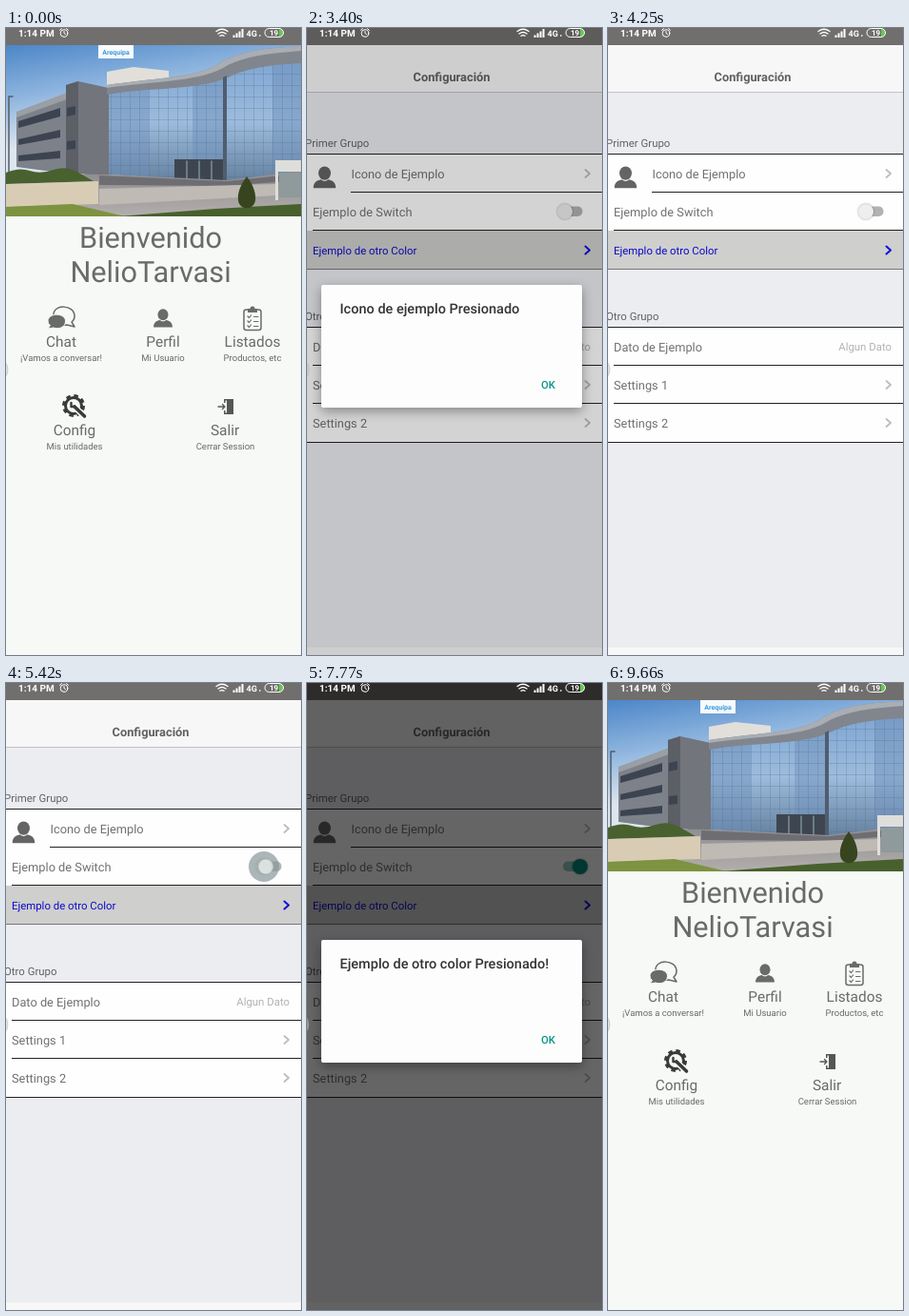
An HTML page for the animation above (9790 ms loop, 310 px wide and 659 px high).

```html
<!DOCTYPE html>
<html lang="es">
<head>
<meta charset="utf-8">
<style>
html, body { margin: 0; width: 100%; height: 100%; overflow: hidden; background: #f7f9f6; }
svg { display: block; width: 310px; height: 659px; font-family: Roboto, sans-serif; text-rendering: geometricPrecision; }
.mid { text-anchor: middle; }
.big { font-size: 30.7px; }
.item { font-size: 15.4px; }
.sub { font-size: 9.5px; }
.row { font-size: 12.8px; }
.small { font-size: 11.4px; }
.line { fill: none; stroke-linecap: round; stroke-linejoin: round; }
#dialog { filter: drop-shadow(0 4px 6px rgba(0, 0, 0, .35)); }
</style>
</head>
<body>
<svg viewBox="0 0 310 659">
  <defs>
    <linearGradient id="sky" x2=".35" y2="1"><stop stop-color="#4c86c8"/><stop offset=".35" stop-color="#8db4de"/><stop offset=".7" stop-color="#dde6ee"/></linearGradient>
    <linearGradient id="glass" x2="0" y2="1"><stop stop-color="#7fa6d2"/><stop offset=".5" stop-color="#9dbcdc"/><stop offset="1" stop-color="#64809f"/></linearGradient>
    <linearGradient id="pavement" x2="0" y2="1"><stop stop-color="#8d8c90"/><stop offset="1" stop-color="#b3aeac"/></linearGradient>
    <pattern id="panes" width="10" height="12" patternUnits="userSpaceOnUse"><path d="M0 0H10M0 0V12" stroke="#4d6c90" stroke-opacity=".55" fill="none"/></pattern>
    <symbol id="person" overflow="visible"><ellipse cy="-5" rx="5.8" ry="6.4"/><path d="M-10.500 9C-10.500 3-7 2-3.500 1Q0 4 3.500 1C7 2 10.500 3 10.500 9Z"/></symbol>
  </defs>

  <g id="home">
    <path fill="#f7f9f6" d="M0 18H310V659H0Z"/>
    <g id="photo">
      <path fill="url(#sky)" d="M0 18H310V160H0Z"/>
      <path fill="#7d8189" d="M11 90 64 70V153L11 146Z"/>
      <path fill="#9a9ea5" d="M11 88 64 68V75L11 94Z"/>
      <path fill="#72757c" d="M63 60 76 56 108 63V156L63 152Z"/>
      <path fill="#5c5f66" d="M63 60 76 56V153L63 152Z"/>
      <path fill="#3c4452" d="M13 98 57 84V93L13 105ZM13 117 57 107V115L13 123ZM13 134 57 129V137L13 140Z"/>
      <path fill="#3c4452" d="M64 84 73 82V91L64 93ZM64 119 73 118V127L64 128Z"/>
      <path fill="#e2dfdb" d="M106 46 134 41 171 45V57L106 66Z"/>
      <path fill="url(#glass)" d="M108 68 228 50 246 37 310 35V152L232 162 108 154Z"/>
      <path fill="#6d8fb8" opacity=".45" d="M108 68 150 64V156L108 154ZM196 58 228 50V161L196 160ZM280 36H310V152L280 156Z"/>
      <path fill="url(#panes)" d="M108 68 228 50 246 37 310 35V152L232 162 108 154Z"/>
      <path fill="#81858e" d="M106 60C150 53 196 53 221 39C241 25 270 21 310 19V37C269 39 249 44 233 52C200 66 151 62 106 70Z"/>
      <path fill="#a9adb4" d="M106 60C150 53 196 53 221 39C241 25 270 21 310 19V24C269 27 246 31 228 42C200 57 151 56 106 63Z"/>
      <path fill="#505d6e" d="M228 52 232 50V163H228Z"/>
      <path fill="#3d4650" d="M177 138H228V162H177Z"/>
      <path class="line" stroke="#7b8d9b" stroke-width="1.500" d="M190 140V160M203 140V160M216 140V160"/>
      <path fill="url(#pavement)" d="M0 153 108 154 232 160 310 150V198H0Z"/>
      <path fill="#6e6e72" d="M98 155 232 161 310 153V160L232 166 98 165Z"/>
      <path fill="#bfbab4" d="M98 169 285 164V176L98 186Z"/>
      <path fill="#49602f" d="M0 152Q14 146 25 150T50 149T78 153L92 161 0 164Z"/>
      <path fill="#d8cdb4" d="M0 164 97 161V185L0 188Z"/>
      <path fill="#7d9340" d="M0 188 70 185 125 198H0Z"/>
      <path fill="#48602c" d="M118 198 220 190 310 185V198Z"/>
      <path fill="#37451f" d="M253 156C259 164 263 173 262 181C261 192 245 192 244 181C243 173 247 164 253 156Z"/>
      <path fill="#dededb" d="M283 139H310V151H286V181H283Z"/>
      <path fill="#8e9a9b" d="M287 152H310V178H287Z"/>
      <path class="line" stroke="#555c64" stroke-width="1.500" d="M3 151V72H7"/>
      <path fill="#f7fafc" d="M97 18H134V32H97Z"/>
      <text class="mid" x="115.500" y="28" font-size="7" font-weight="700" fill="#3a9bdc">Arequipa</text>
    </g>
    <g fill="#696b6a" class="mid">
      <text class="big" x="152" y="231">Bienvenido</text>
      <text class="big" x="152" y="267">NelioTarvasi</text>
      <g class="line" stroke="#696b6a" stroke-width="1.500">
        <path d="M50 302C49 290 72 290 72 303Q72 307 69 309L72 314 64 312Q58 313 54 310"/>
        <rect x="250" y="296" width="18" height="21.500" rx="2.500"/>
        <path d="M254 303l1.500 1.500 2-2.500M254 308l1.500 1.500 2-2.500M254 313l1.500 1.500 2-2.500M260.500 303.500H265M260.500 308.500H265M260.500 313.500H265" stroke-width="1.200"/>
      </g>
      <path d="M254 299V295H256.500A2.500 2.500 0 0 1 261.500 295H264V299Z"/>
      <path d="M44 308C44 299 62.500 299 62.500 308C62.500 315 55 317 50 315L44 316 46.500 312.500Q44 311 44 308Z" stroke="#f7f9f6"/>
      <use href="#person" transform="translate(165 306) scale(.95)"/>
      <text class="item" x="58" y="335">Chat</text><text class="sub" x="58" y="349.500">¡Vamos a conversar!</text>
      <text class="item" x="165" y="335">Perfil</text><text class="sub" x="165" y="349.500">Mi Usuario</text>
      <text class="item" x="259" y="335">Listados</text><text class="sub" x="259" y="349.500">Productos, etc</text>
      <g id="config">
        <g fill="none" stroke="#393b3a">
          <circle cx="71" cy="397" r="8.500" stroke-width="3"/>
          <circle cx="71" cy="397" r="10.500" stroke-width="3" stroke-dasharray="4.500 3.750"/>
          <path class="line" stroke="#f7f9f6" stroke-width="6.500" d="M72 398 82 408"/>
          <path class="line" stroke-width="3.600" d="M72 398 82.500 408"/>
          <path class="line" stroke-width="2.400" d="M68.500 394V398H72.500"/>
        </g>
        <text class="item" x="72" y="428">Config</text><text class="sub" x="72" y="443">Mis utilidades</text>
      </g>
      <path fill="#555756" d="M229 390H239V406H229V402H230.500V404.500H232V391.500H230.500V394H229ZM233 392 237.500 391V405L233 406Z"/>
      <path class="line" stroke="#555756" stroke-width="1.300" d="M223 398H230M227.500 395.500 230 398 227.500 400.500"/>
      <text class="item" x="230" y="428">Salir</text><text class="sub" x="230.500" y="443">Cerrar Session</text>
    </g>
  </g>

  <g id="settings">
    <path fill="#ecedf1" d="M0 18H310V651H0Z"/>
    <path fill="#f7f7f7" d="M0 18H310V67H0ZM0 651H310V659H0Z"/>
    <path stroke="#c2c3c5" d="M0 67.500H310"/>
    <path fill="#fefefe" d="M0 132H310V213H0ZM0 314H310V436H0Z"/>
    <path fill="#cfcfce" d="M0 213H310V253H0Z"/>
    <path stroke="#222" stroke-width="1.200" d="M0 132.500H310M46 172.500H310M6 212.500H310M0 314.500H310M6 354.500H310M6 394.500H310M0 435.500H310"/>
    <path stroke="#777" d="M0 253.500H310"/>
    <text class="mid row" x="152" y="56" font-weight="700" fill="#606162">Configuración</text>
    <g class="small" fill="#626366"><text x="-2" y="125">Primer Grupo</text><text x="-2" y="307">Otro Grupo</text></g>
    <use href="#person" transform="translate(18.500 158.200) scale(1.120)" fill="#646464"/>
    <g class="row" fill="#717171">
      <text x="46.500" y="158">Icono de Ejemplo</text>
      <text x="6" y="198">Ejemplo de Switch</text>
      <text x="6" y="340">Dato de Ejemplo</text>
      <text x="6" y="380">Settings 1</text>
      <text x="6" y="420">Settings 2</text>
    </g>
    <text class="small" x="6" y="238" fill="#0d0bc8">Ejemplo de otro Color</text>
    <text class="small" x="298" y="339" text-anchor="end" fill="#b2b2b4">Algun Dato</text>
    <g class="line" stroke="#bcbcc0" stroke-width="1.700">
      <path d="M292.500 149 297 153 292.500 157M292.500 371 297 375 292.500 379M292.500 411 297 415 292.500 419"/>
      <path stroke="#1210d8" stroke-width="2" d="M292.500 229.500 297 233.500 292.500 237.500"/>
    </g>
    <rect id="track" x="269" y="187.500" width="20.500" height="10.500" rx="5"/>
    <circle id="thumb" cy="193" r="8" style="filter:drop-shadow(0 .5px .8px rgba(0,0,0,.4))"/>
    <circle id="ripple" cy="193" fill="#87979a"/>
  </g>

  <path fill="#706f6d" d="M0 0H310V18H0Z"/>
  <path id="dim" d="M0 0H310V659H0Z"/>

  <g fill="#fff">
    <text x="13" y="9" font-size="10" font-weight="700">1:14 PM</text>
    <g class="line" stroke="#fff">
      <circle cx="61" cy="5.500" r="3.800"/><path d="M61 3.500V5.500L62.500 6.500M56.500 2.300 58.500 .6M65.500 2.300 63.500 .6"/>
      <path stroke-width="1.300" d="M221 3.500Q227 -1 233 3.500M223 6Q227 3 231 6M225 8.300Q227 7 229 8.300"/>
    </g>
    <path d="M238.500 7.500h2V10h-2ZM241.500 5.500h2V10h-2ZM244.500 3.500h2V10h-2ZM247.500 1h2V10h-2Z"/>
    <text x="252.500" y="9" font-size="9" font-weight="700">4G</text>
    <path d="M266 7h1.500v2H266Z" opacity=".7"/>
    <path d="M287 .5Q291.500 .5 291.500 5T287 9.500Z" fill="#67c653"/>
    <rect x="272" y=".5" width="19.500" height="9" rx="4.500" fill="none" stroke="#fff"/>
    <text class="mid" x="281.500" y="8" font-size="8" font-weight="700">19</text>
  </g>

  <g id="dialog">
    <rect x="15" y="270" width="274" height="129" rx="2" fill="#fdfdfd"/>
    <text id="title" x="34.500" y="300" font-size="14.500" font-weight="500" fill="#333"></text>
    <text x="246" y="378.500" font-size="11.300" font-weight="500" fill="#0b978a">OK</text>
  </g>

  <circle cx="-11" cy="359" r="13" fill="#ccc" fill-opacity=".5" stroke="#999" stroke-opacity=".35"/>
  <circle id="touch" r="8" fill="#fff" fill-opacity=".6" stroke="#999" stroke-opacity=".4"/>
</svg>

<script>
const LOOP = 9790;
const $ = Object.fromEntries([...document.querySelectorAll('[id]')].map(e => [e.id, e]));
const ramp = (t, from, to) => Math.min(1, Math.max(0, (t - from) / (to - from)));
const pulse = (t, on, rise, off, fall) => ramp(t, on, on + rise) * (1 - ramp(t, off, off + fall));
const set = (el, attrs) => { for (const k in attrs) el.setAttribute(k, attrs[k]); };
const mix = (a, b, p) => `rgb(${a.map((v, i) => Math.round(v + (b[i] - v) * p))})`;

// Each press on the switch toggles it on release.
const switchTaps = [[4510, 4660], [4960, 5060], [5340, 5540], [5860, 5960], [6380, 6440]];
const dialogs = [
  { text: 'Icono de ejemplo Presionado', shown: 3550, gone: 4280, x: 252, y: 368 },
  { text: 'Ejemplo de otro color Presionado!', shown: 7420, gone: 8490, x: 263, y: 370 }
];
const touches = [
  ...switchTaps.map(([down, up]) => ({ x: 273, y: 193, down, up })),
  ...dialogs.map(({ x, y, gone }) => ({ x, y, down: gone - 280, up: gone - 130 }))
];

function drawScreens(t) {
  $.config.setAttribute('opacity', 1 - .8 * pulse(t, 990, 150, 1150, 250));
  const leave = ramp(t, 9250, 9560) ** 2;
  const enter = ramp(t, 1960, 2020);
  const drop = 8 * (1 - enter) + 140 * leave;
  set($.settings, { opacity: enter * (1 - leave), transform: `translate(0 ${drop})` });
}

function drawSwitch(t) {
  let on = 0, ripple = 0, size = 0;
  switchTaps.forEach(([down, up], i) => {
    on += (i % 2 ? -1 : 1) * ramp(t, up, up + 110);
    const glow = pulse(t, down, 60, up, 250);
    if (glow > ripple) { ripple = glow; size = ramp(t, down, down + 70); }
  });
  const x = 271 + 16 * on;
  $.track.setAttribute('fill', mix([178, 178, 178], [143, 200, 194], on));
  set($.thumb, { cx: x, fill: mix([238, 238, 238], [0, 139, 124], on) });
  set($.ripple, { cx: x, r: 8 + 8 * size, opacity: .7 * ripple });
}

function drawDialog(t) {
  const d = dialogs[t < 5000 ? 0 : 1];
  $.title.textContent = d.text;
  $.dialog.setAttribute('opacity', pulse(t, d.shown - 250, 95, d.gone - 190, 107));
  $.dim.setAttribute('opacity', .6 * pulse(t, d.shown - 195, 165, d.gone - 150, 110));
}

function drawTouch(t) {
  const hit = touches.find(p => t >= p.down && t < p.up + 60);
  set($.touch, hit
    ? { cx: hit.x, cy: hit.y, opacity: pulse(t, hit.down, 30, hit.up, 60) }
    : { opacity: 0 });
}

const start = performance.now();
function frame() {
  const t = (performance.now() - start) % LOOP;
  drawScreens(t);
  drawSwitch(t);
  drawDialog(t);
  drawTouch(t);
  requestAnimationFrame(frame);
}
frame();
</script>
</body>
</html>
```
